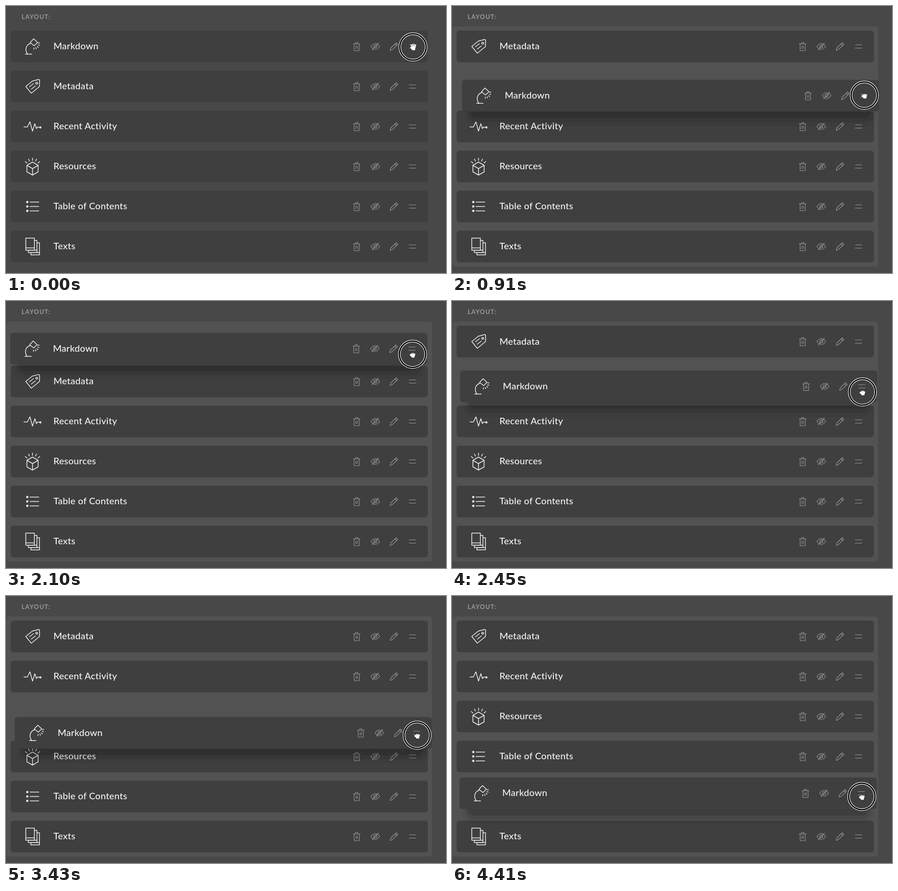
An HTML page for the animation above (4.55 s loop, 946x574 px).

```html
<!DOCTYPE html>
<html lang="en">
<head>
<meta charset="utf-8">
<title>Layout list</title>
<style>
  html, body { margin: 0; width: 100%; height: 100%; overflow: hidden; background: #484848; }
  svg { display: block; width: 100vw; height: 100vh; }
  text { font-family: Lato, "Open Sans", sans-serif; }
  .heading { font-size: 13px; font-weight: 700; letter-spacing: 1.3px; fill: #9b9b9b; }
  .name { font-size: 20px; font-weight: 500; letter-spacing: .25px; fill: #f4f4f4; }
  .icon { fill: none; stroke: #f4f4f4; stroke-width: 1.5; stroke-linejoin: round; }
  .tools { fill: none; stroke: #9d9d9d; stroke-width: 1.1; stroke-linejoin: round; }
  .dot { fill: #f4f4f4; stroke: none; }
  .page { fill: #3f3f3f; }
  .hand { fill: none; stroke-linecap: round; stroke-linejoin: round; }
</style>
</head>
<body>
<svg viewBox="0 0 946 574">
  <defs>
    <g id="tools" class="tools">
      <path d="M746 28.5H762M751.5 28.5V25.5H756.5V28.5M748.5 28.5V43H759.5V28.5M752.5 32.5V39M755.5 32.5V39"/>
      <path d="M784.5 34Q794 21 803.5 34Q794 47 784.5 34ZM801 26.5L787 41.5"/>
      <circle cx="794" cy="34" r="3.3"/>
      <path d="M826 42.5L827.5 37L839 26L842.5 29.5L830.5 40.8ZM836.5 28.5L839.7 31.8"/>
      <path d="M866.5 30.5H881.5M866.5 37.5H881.5"/>
    </g>
  </defs>
  <rect width="946" height="574" fill="#484848"/>
  <rect id="panel" x="1" y="44" width="915" height="516" rx="6" fill="#525252"/>
  <text class="heading" x="33.5" y="28">LAYOUT:</text>
  <g id="list"></g>
  <g id="cursor">
    <circle class="ring" fill="none" stroke="#fff" stroke-width="5.2"/>
    <circle class="ring" fill="none" stroke="#000" stroke-width="2.8"/>
    <g id="open"></g>
    <g id="closed"></g>
    <path id="arrow" d="M-1 -2V14L2.7 10.7L5.2 16.4L7.9 15.2L5.5 9.7H10.3Z" fill="#111" stroke="#fff" stroke-width="1.2"/>
  </g>
</svg>
<script>
const LOOP = 4550, STEP = 70, TOP = 53, PITCH = 86, GRIP = 35;
const $ = id => document.getElementById(id);
const clamp = v => Math.min(1, Math.max(0, v));
const range = (n, f) => Array.from({ length: n }, (_, i) => f(i));

const dot = (x, y, r) => `<circle class="dot" cx="${x}" cy="${y}" r="${r}"/>`;
const line = d => `<path d="${d}"/>`;

// Point at an angle in degrees, clockwise from the right
function polar(x, y, r, deg) {
  const a = deg * Math.PI / 180;
  return `${(x + r * Math.cos(a)).toFixed(2)} ${(y + r * Math.sin(a)).toFixed(2)}`;
}
const rays = (x, y, from, to, start, gap) => line(range(5, i =>
  `M${polar(x, y, from, start + i * gap)}L${polar(x, y, to, start + i * gap)}`).join(""));

const lamp = line("M41 50.5H56M46.5 50.5C40 42 42 31 53 27M59.5 17.5L68 25.5L60.5 32.5L52 25.5Z") +
  rays(60.5, 28, 8.5, 12.5, -8, 25);
const tag = line("M42.5 34L56.5 22.5L69.5 19Q72 18.8 72.3 21.5L72 34L54.5 48.5ZM50 35L59.5 27.5M54 40L63.5 32.5") +
  '<circle cx="66" cy="27" r="2"/>';
const pulse = line("M38 35H46L51.5 24L57 44L62 28L65.5 38.5L67.5 35.5H74") + dot(74, 36, 2.2);

const corner = i => polar(57, 38.5, 14, 60 * i - 90);
const box = rays(57, 36.5, 15, 21, -140, 25) +
  line(`M${range(6, corner).join("L")}Z` + [1, 3, 5].map(i => `M57 38.5L${corner(i)}`).join(""));

const bullets = range(3, i => 24.5 + 9.5 * i)
  .map(y => dot(45.8, y, 2.4) + line(`M51 ${y}H71`)).join("");
const books = [2, 1, 0].map(i =>
  `<path class="page" d="M${42.5 + 5.5 * i} ${16 + 5 * i}h18.500v26h-18.500zm0 21h18.500"/>`).join("");

const items = [
  ["Markdown", lamp], ["Metadata", tag], ["Recent Activity", pulse],
  ["Resources", box], ["Table of Contents", bullets], ["Texts", books]
];

// Soft shadow below the lifted card, built from nested bands
const shadow = '<g id="shadow">' + range(3, i => {
  const inset = 6 + 6 * i;
  return `<rect x="${10 + inset}" y="20" width="${897 - 2 * inset}" height="${80 - 9 * i}" rx="${24 - 5 * i}" fill-opacity="${.05 + .04 * i}"/>`;
}).join("") + "</g>";

const cards = items.map(([name, icon], i) => {
  const g = document.createElementNS("http://www.w3.org/2000/svg", "g");
  g.innerHTML = (i ? "" : shadow) +
    '<rect x="10" width="897" height="68" rx="6" fill="#3f3f3f"/>' +
    `<g class="icon">${icon}</g><text class="name" x="102" y="40.3">${name}</text><use href="#tools"/>`;
  return g;
});
$("list").append(...cards.slice(1), cards[0]);

// Four fingers and a thumb fanned out from the palm
function hand(reach, fan) {
  const fingers = range(4, i => `M${i * 1.6 - 1.4} 5L${polar(.8, 4, reach, -90 + (i - 1.5) * fan)}`);
  const d = fingers.join("") + "M-1 5L-5 1.5M-1 6H3.5";
  return `<g class="hand"><path d="${d}" stroke="#222" stroke-width="4"/><path d="${d}" stroke="#fff" stroke-width="2.4"/></g>`;
}
$("open").innerHTML = hand(10, 20);
$("closed").innerHTML = hand(6, 30);

// Drag strokes: start, end, card x, card y, pointer height on the card
const strokes = [
  [70, 500, 22, 163, 45], [840, 1387, 9, 68.5, 33], [2100, 2520, 18, 156, 46],
  [2750, 3210, 19, 257, 44], [3370, 3780, 17, 313, 39], [4000, 4410, 16, 390, 41]
];

// Neighbour moves: start, card, direction in slots
const shifts = [[275, 1, -1], [1215, 1, 1], [2275, 1, -1], [2907, 2, -1], [3530, 3, -1], [4220, 4, -1]];

const smooth = u => u * u * (3 - 2 * u);
const settle = u => 1 - (1 - u) ** 2.8;

// The pointer takes its grip one step before the card follows
function drag(t) {
  let x = 10, y = TOP, grip = GRIP;
  for (const [start, end, toX, toY, toGrip] of strokes) {
    const p = smooth(clamp((t - start) / (end - start)));
    x += (toX - x) * p;
    y += (toY - y) * p;
    grip += (toGrip - grip) * clamp((t - start) / STEP + 1);
  }
  return { x, y, grip };
}

const place = (el, x, y) => el.setAttribute("transform", `translate(${x.toFixed(2)} ${y.toFixed(2)})`);
const show = (id, on) => $(id).setAttribute("visibility", on ? "visible" : "hidden");

function draw(ms) {
  const t = Math.floor((ms % LOOP) / STEP) * STEP;
  const slots = range(items.length, i => i);
  for (const [start, i, dir] of shifts) slots[i] += dir * settle(clamp((t - start) / 200));
  for (let i = 1; i < cards.length; i++) place(cards[i], 0, TOP + PITCH * slots[i]);

  const { x, y, grip } = drag(t);
  place(cards[0], x - 10, y);
  place($("cursor"), x + 865, y + grip);

  const lift = clamp(t / 210);
  $("panel").setAttribute("opacity", lift);
  $("shadow").setAttribute("opacity", lift);

  const pointing = t >= 2870 && t < 3010;
  document.querySelectorAll(".ring").forEach(c => c.setAttribute("r", pointing ? 19.3 : 28.3));
  show("arrow", pointing);
  show("open", t < STEP);
  show("closed", t >= STEP && !pointing);
}

let begin;
function tick(now) {
  begin ??= now;
  draw(now - begin);
  requestAnimationFrame(tick);
}
draw(0);
requestAnimationFrame(tick);
</script>
</body>
</html>
```
